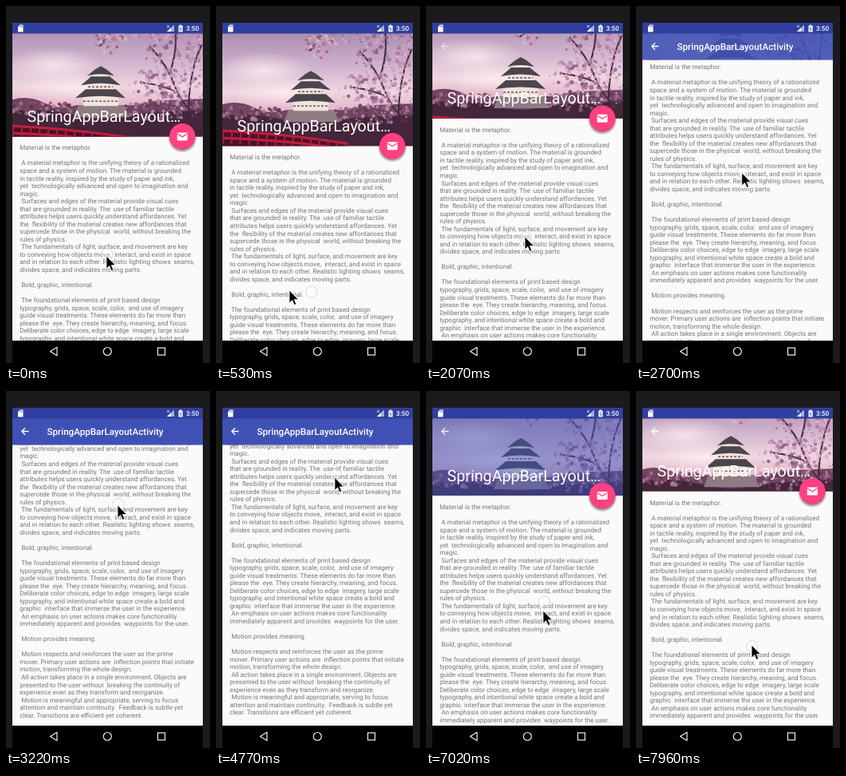
Write an HTML page that moves like this. It is 256x447 px and loops after 8 s.

```html
<!DOCTYPE html>
<html lang="en">
<head>
<meta charset="utf-8">
<title>Spring app bar</title>
<style>
  html, body { margin: 0; width: 100%; height: 100%; overflow: hidden; background: #1b1b1d; }
  svg { display: block; width: 256px; height: 447px; }
  text { font-family: Roboto, sans-serif; white-space: pre; text-rendering: geometricPrecision; }
  #body { font-size: 8.14px; fill: #757575; }
</style>
</head>
<body>
<svg viewBox="0 0 256 447">
  <defs>
    <clipPath id="barClip"><rect id="barShape" x="8" y="21" width="239" height="100"/></clipPath>
    <linearGradient id="sky" x1="0" y1="0" x2="0" y2="1">
      <stop offset=".1" stop-color="#a78bab"/>
      <stop offset=".35" stop-color="#cdb0cb"/>
      <stop offset=".55" stop-color="#f0d6e0"/>
      <stop offset=".7" stop-color="#e3b4c8"/>
    </linearGradient>
    <radialGradient id="cloud">
      <stop offset="0" stop-color="#fff1f3" stop-opacity=".75"/>
      <stop offset="1" stop-color="#fff1f3" stop-opacity="0"/>
    </radialGradient>
    <radialGradient id="shade">
      <stop offset=".8" stop-opacity=".4"/>
      <stop offset="1" stop-opacity="0"/>
    </radialGradient>
  </defs>

  <rect x="8" y="21" width="239" height="400" fill="#fafafa"/>
  <g id="body"></g>

  <g clip-path="url(#barClip)">
    <g id="photo">
      <rect x="8" y="-84" width="239" height="168" fill="url(#sky)"/>
      <ellipse cx="60" cy="-18" rx="62" ry="22" fill="url(#cloud)"/>
      <ellipse cx="85" cy="10" rx="65" ry="18" fill="url(#cloud)"/>
      <path d="M8 25Q28 19 48 29T88 32H160L190 26 247 24V84H8Z" fill="#6f4560"/>
      <path d="M8 40Q40 34 84 44T150 43L247 38V84H8Z" fill="#43263a"/>
      <g id="grove"></g>
      <path d="M85 47L91 32H148L155 47Z" fill="#8f7c83"/>
      <path d="M97 19H141V33H97ZM103 3H134V13H103ZM109-8H128V-2H109Z" fill="#efe3dd"/>
      <path d="M97 27H141M103 9H134" stroke="#6a5a60" stroke-width="1.5" stroke-dasharray="3 2"/>
      <path d="M87 23L100 12H138L150 23Q118 18 87 23ZM94 7L107-4H130L144 7Q118 2 94 7ZM102-5L112-13 119-17 126-13 136-5Q118-9 102-5Z" fill="#4b454c"/>
      <path d="M8 57Q80 60 165 73V84H8Z" fill="#4c1227"/>
      <path d="M8 58Q80 61 165 74M8 67Q80 69 165 81" fill="none" stroke="#c31f42" stroke-width="3"/>
      <path d="M8 66Q80 69 165 80" fill="none" stroke="#b01c3b" stroke-width="16" stroke-dasharray="2 9"/>
      <path d="M247 52Q222 35 212 8T180-42M216 16Q194 6 172 4M229 36Q230-10 246-45M205-8Q216-35 212-68M150-84Q130-60 118-42" fill="none" stroke="#4a2b42" stroke-width="2.2"/>
      <g id="blossom"></g>
    </g>
    <rect id="scrim" x="8" y="21" width="239" height="160" fill="#3f51b5"/>
    <path id="back" d="M28.5 50.5H20M24 46.3L19.8 50.5 24 54.7" fill="none" stroke="#fff" stroke-width="1.3"/>
    <text id="title" fill="#fff"></text>
  </g>

  <g id="fab">
    <circle cy="2" r="18.5" fill="url(#shade)"/>
    <circle r="16.4" fill="#ff4081"/>
    <rect x="-6.5" y="-5" width="13" height="10" rx="1" fill="#fff"/>
    <path d="M-6-3.6L0 .4 6-3.6" fill="none" stroke="#ff4081" stroke-width="1.3"/>
  </g>

  <rect x="8" y="21" width="239" height="13.5" fill="#303f9f"/>
  <g fill="#fff">
    <path d="M15 26L17.3 23.5H21.5V32.5H15Z"/>
    <path d="M17 24.5V26.5M18.6 24.5V26.5M20.2 24.5V26.5" stroke="#303f9f" stroke-width=".7"/>
    <path d="M202 32L211 23.5V32Z" opacity=".6"/>
    <path d="M202 32L207 27.3V32Z"/>
    <path d="M202 24L205 27M205 24L202 27" stroke="#fff" stroke-width=".8"/>
    <path d="M216.5 24.5H218V23.5H220V24.5H221.7V32.5H216.5Z"/>
    <path d="M219.6 25.5L217.8 29H220.4L218.8 31.5" fill="none" stroke="#303f9f" stroke-width=".7"/>
    <text x="226" y="31" font-size="8.2" font-weight="500">3:50</text>
  </g>

  <path d="M0 0H256V447H0ZM8 21V419H247V21Z" fill="#1b1b1d" fill-rule="evenodd"/>
  <rect x="8" y="419" width="239" height="28"/>
  <g fill="none" stroke="#eee" stroke-width="1.2">
    <path d="M64 427.3V437.7L55.5 432.5Z" stroke-linejoin="round"/>
    <circle cx="127.3" cy="432.5" r="5"/>
    <rect x="190.5" y="428" width="9" height="9"/>
  </g>

  <circle id="touch" r="7.2" fill="#fff" fill-opacity=".35" stroke="#a9a9cc" stroke-opacity=".55" stroke-width=".8"/>
  <path id="cursor" d="M0 0V16L3.7 12.6 6.2 18.4 8.8 17.3 6.3 11.6H11.3Z" stroke="#fff" stroke-width=".8"/>
</svg>

<script>
const $ = id => document.getElementById(id);
const LOOP = 8000, COLLAPSED = 67.6, EXPANDED = 125.6, LINE = 9.535;

const copy = `Material is the metaphor.

 A material metaphor is the unifying theory of a rationalized
space and a system of motion. The material is grounded
in tactile reality, inspired by the study of paper and ink,
yet  technologically advanced and open to imagination and
magic.
 Surfaces and edges of the material provide visual cues
that are grounded in reality. The  use of familiar tactile
attributes helps users quickly understand affordances. Yet
the  flexibility of the material creates new affordances that
supercede those in the physical  world, without breaking the
rules of physics.
 The fundamentals of light, surface, and movement are key
to conveying how objects move,  interact, and exist in space
and in relation to each other. Realistic lighting shows  seams,
divides space, and indicates moving parts.

 Bold, graphic, intentional.

 The foundational elements of print based design
typography, grids, space, scale, color,  and use of imagery
guide visual treatments. These elements do far more than
please the  eye. They create hierarchy, meaning, and focus.
Deliberate color choices, edge to edge  imagery, large scale
typography, and intentional white space create a bold and
graphic  interface that immerse the user in the experience.
 An emphasis on user actions makes core functionality
immediately apparent and provides  waypoints for the user.

 Motion provides meaning.

 Motion respects and reinforces the user as the prime
mover. Primary user actions are  inflection points that initiate
motion, transforming the whole design.
 All action takes place in a single environment. Objects are
presented to the user without  breaking the continuity of
experience even as they transform and reorganize.
 Motion is meaningful and appropriate, serving to focus
attention and maintain continuity.  Feedback is subtle yet
clear. Transitions are efficient yet coherent.`;

function add(parent, tag, attrs) {
  const node = document.createElementNS('http://www.w3.org/2000/svg', tag);
  for (const key in attrs) node.setAttribute(key, attrs[key]);
  return parent.appendChild(node);
}

copy.split('\n').forEach((line, i) => {
  add($('body'), 'text', { x: 17.2, y: 7.6 + i * LINE }).textContent = line;
});

let seed = 7;
const random = () => (seed = seed * 16807 % 2147483647) / 2147483647;

function scatter(group, count, cx, cy, rx, ry, colors) {
  for (let i = 0; i < count; i++) {
    const angle = random() * 2 * Math.PI, reach = Math.sqrt(random());
    add(group, 'circle', {
      cx: (cx + rx * reach * Math.cos(angle)).toFixed(1),
      cy: (cy + ry * reach * Math.sin(angle)).toFixed(1),
      r: (.8 + random() * 2).toFixed(1),
      fill: colors[i % colors.length], opacity: .8
    });
  }
}
const pinks = ['#c794b8', '#e2bbd3', '#a9749c', '#d3a2c2', '#8a597f'];
scatter($('grove'), 90, 45, 36, 42, 9, ['#7d4a66', '#5a3049', '#b27c98']);
scatter($('grove'), 110, 195, 38, 52, 12, ['#8f5f83', '#5d3652', '#b98aac']);
scatter($('blossom'), 260, 222, -22, 46, 60, pinks);
scatter($('blossom'), 110, 190, 4, 38, 20, pinks);
scatter($('blossom'), 90, 170, -62, 50, 16, pinks);
scatter($('blossom'), 60, 128, -48, 16, 17, pinks);

// Linear interpolation through [time, ...values] keys.
function track(keys, t) {
  const i = keys.findIndex(key => key[0] > t);
  if (i < 0) return keys[keys.length - 1].slice(1);
  const a = keys[i - 1], b = keys[i], f = (t - a[0]) / (b[0] - a[0]);
  return a.slice(1).map((v, k) => v + (b[k + 1] - v) * f);
}

const barKeys = [[0, 163.5], [50, 163.5], [530, 175.3], [1430, 175.3], [2070, 141], [2650, COLLAPSED],
  [6440, COLLAPSED], [6850, 122], [7150, 138], [7350, 129], [7610, EXPANDED]];
const scrollKeys = [[0, 0], [2650, 0], [3220, 57.2], [3600, 60.5], [5990, 60.5], [6440, 0]];
const scrimKeys = [[0, 0], [2290, 0], [2750, 1], [6750, 1], [7300, 0]];
const fabKeys = [[0, 1], [2380, 1], [2580, 0], [6700, 0], [6900, 1]];
const cursorKeys = [[0, 126, 313], [50, 126, 313], [530, 92, 356], [1430, 92, 356], [1550, 120, 349],
  [2070, 124, 289], [3220, 140, 143], [3850, 150, 50], [4430, 150, 47], [4770, 149, 108], [5180, 142, 229],
  [5240, 142, 231], [5810, 147, 133], [5990, 147, 134], [6450, 148, 217], [7610, 146, 335], [7960, 145, 318]];
const touchKeys = [[0, 127, 311], [50, 127, 311], [530, 120, 358], [1430, 120, 358], [2070, 125, 290],
  [3220, 141, 142], [3850, 151, 48], [4430, 151, 48], [4770, 150, 104], [5180, 143, 222],
  [5240, 143, 226], [5810, 147, 132], [5990, 147, 133], [6450, 150, 199], [7610, 147, 331], [7960, 146, 320]];

const move = (id, x, y, extra = '') => $(id).setAttribute('transform', `translate(${x} ${y})${extra}`);
const mix = (a, b, f) => a + (b - a) * f;

function draw(t) {
  const [bar] = track(barKeys, t), [scroll] = track(scrollKeys, t), [fab] = track(fabKeys, t);
  const open = Math.min(1, (bar - COLLAPSED) / (EXPANDED - COLLAPSED));
  const stretch = Math.max(0, bar - EXPANDED);

  $('barShape').setAttribute('height', bar - 21);
  move('body', 0, bar + 9.3 - scroll);
  move('photo', 0, 73.3 + (bar - EXPANDED) / 2);
  $('scrim').setAttribute('opacity', track(scrimKeys, t)[0]);
  $('back').setAttribute('opacity', Math.max(0, 1 - stretch / 36));

  const title = $('title');
  title.textContent = open > 0 ? 'SpringAppBarLayout…' : 'SpringAppBarLayoutActivity';
  title.setAttribute('x', mix(51.5, 26.5, open));
  title.setAttribute('y', mix(55, 107, open) + stretch);
  title.setAttribute('font-size', mix(11.63, 19.7, open));
  title.setAttribute('font-weight', open < .06 ? 500 : 400);

  move('fab', 221.3, bar, ` scale(${fab})`);
  move('touch', ...track(touchKeys, t));
  move('cursor', ...track(cursorKeys, t));
}

const start = performance.now();
function tick() {
  draw((performance.now() - start) % LOOP);
  requestAnimationFrame(tick);
}
tick();
</script>
</body>
</html>
```
